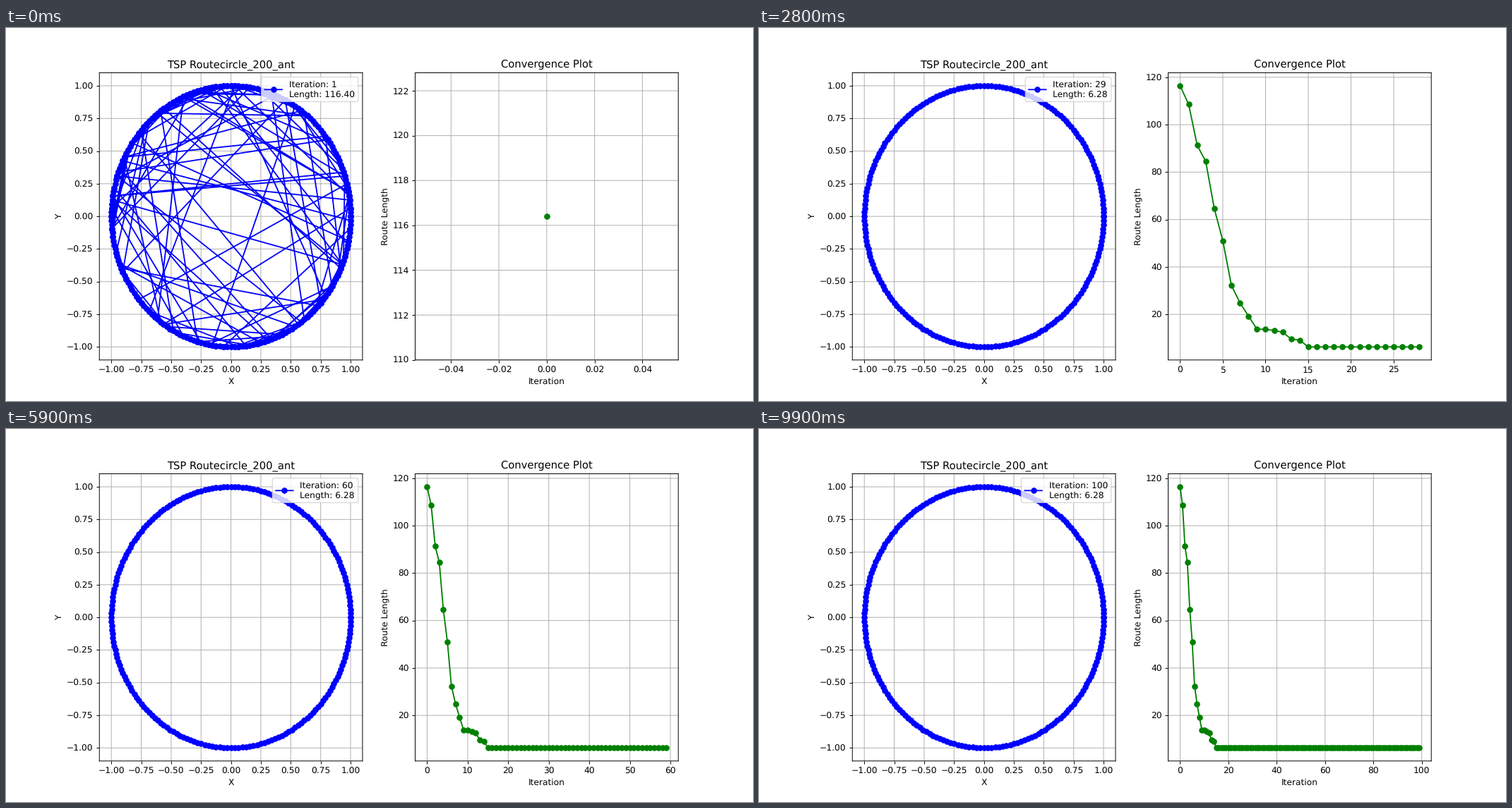
A matplotlib script that plays this animation: 1058x529 px, repeating every 10 s.

```python
import numpy as np
import matplotlib.pyplot as plt
from matplotlib.animation import FuncAnimation

# smooth, unsnapped strokes and glyphs
plt.rcParams.update({"path.snap": False, "text.hinting": "no_hinting"})

CITIES = 200
ITERATIONS = 100
RING = 2 * CITIES * np.sin(np.pi / CITIES)

# best route length per iteration until it settles on the ring
falling = [116.40, 108.6, 91.3, 84.5, 64.6, 51.05, 32.3, 24.9, 19.3,
           13.75, 13.7, 13.2, 12.5, 9.62, 9.12]
lengths = np.full(ITERATIONS, RING)
lengths[:len(falling)] = falling

DETOURS = (94, 116)  # cities where the last two detours begin
RANDOM_STAGE = 13    # iterations before only those detours are left

angle = 2 * np.pi * np.arange(CITIES) / CITIES
cities = np.column_stack([np.cos(angle), np.sin(angle)])


def random_hops(excess, seed):
    """Hops across the circle that add up to the excess length."""
    rng = np.random.default_rng(seed)
    while excess > 0.2:
        start = rng.integers(CITIES)
        span = 5 + int(90 * rng.random() ** 1.5)
        yield start, start + span
        excess -= 2 * np.sin(np.pi * span / CITIES)


def detour_hops(excess):
    """Each detour goes out and comes back beside itself."""
    hop = excess / (2 * len(DETOURS))
    span = round(CITIES / np.pi * np.arcsin(hop / 2)) + 2
    for start in DETOURS:
        yield start, start + span
        yield start + 1, start + span - 1


def route_at(i):
    excess = lengths[i] - RING
    if i < RANDOM_STAGE:
        hops = random_hops(excess, seed=40 + i)
    else:
        hops = detour_hops(excess) if excess > 0 else ()
    parts = [cities, cities[:1]]
    for a, b in hops:
        parts += [[[np.nan, np.nan]], cities[[a % CITIES, b % CITIES]]]
    return np.vstack(parts)


def style(ax, title, xlabel, ylabel):
    ax.set(title=title, xlabel=xlabel, ylabel=ylabel)
    ax.grid(True)


fig, (ax_route, ax_conv) = plt.subplots(1, 2, figsize=(12, 6), dpi=529 / 6)
route, = ax_route.plot(*cities.T, "bo-")
curve, = ax_conv.plot([0], lengths[:1], "go-")
style(ax_route, "TSP Routecircle_200_ant", "X", "Y")
style(ax_conv, "Convergence Plot", "Iteration", "Route Length")


def update(i):
    route.set_data(*route_at(i).T)
    route.set_label(f"Iteration: {i + 1}\nLength: {lengths[i]:.2f}")
    ax_route.legend(loc="upper right")
    curve.set_data(np.arange(i + 1), lengths[:i + 1])
    ax_conv.relim()
    ax_conv.autoscale_view()
    return route, curve


anim = FuncAnimation(fig, update, frames=ITERATIONS, interval=100,
                     init_func=lambda: update(0), repeat=True, blit=False)
plt.show()
```
